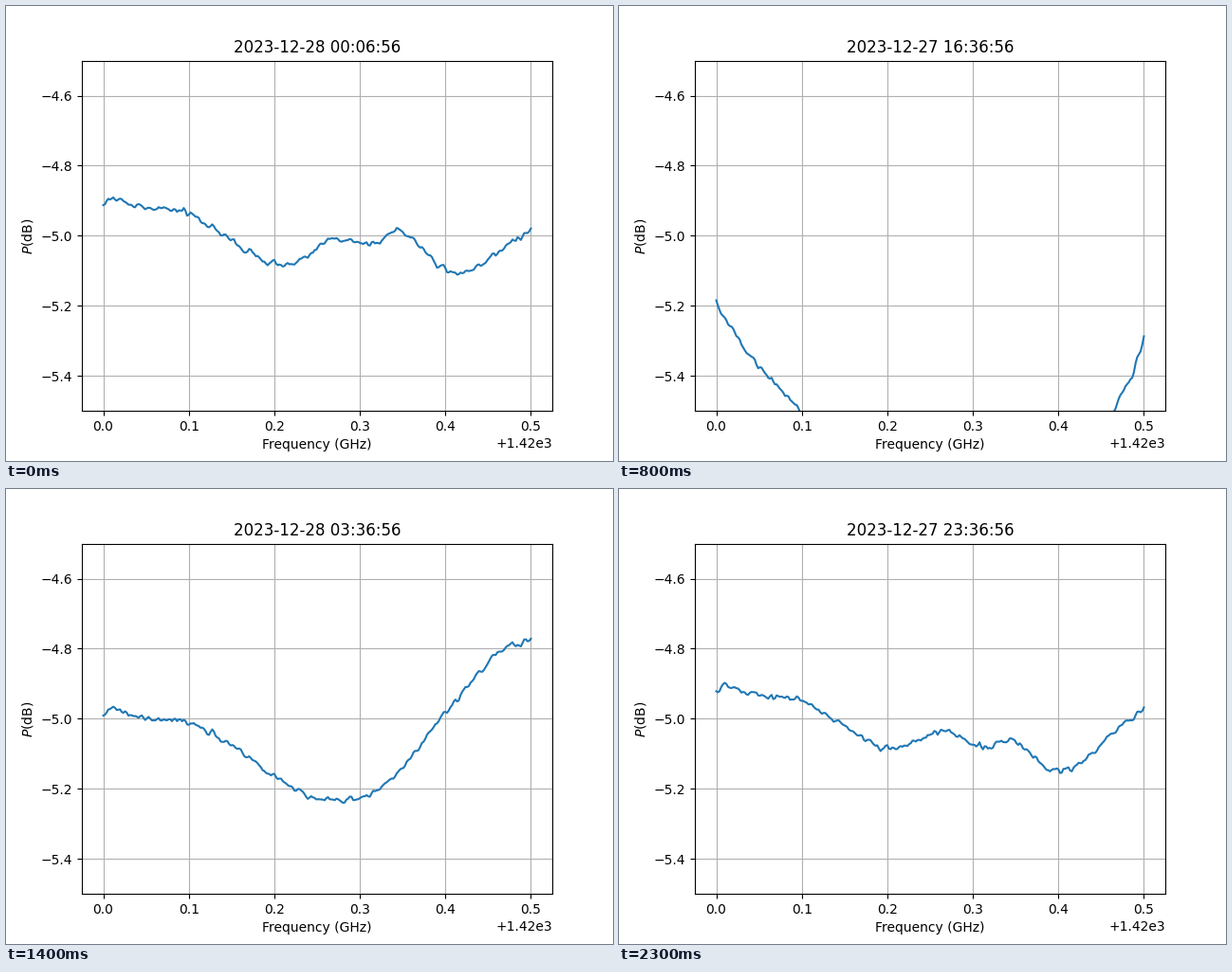
These frames come from a looping animation (640 px wide and 480 px high, 2400 ms). A matplotlib script:

```python
import numpy as np
import matplotlib.pyplot as plt
from matplotlib.animation import FuncAnimation

# Half-hour steps counted from 17:06:56 on the first day, shown out of order
ORDER = [14, 14, 5, 19, 8, 11, 16, 2, -1, 6, 17, 10,
         3, 20, 21, 7, 12, 1, 18, 9, 0, 15, 4, 13]
DUSK, DARK, DAWN = 8, 13, 21

x = np.linspace(0, .5, 256)


def ripple(seed):
    noise = np.random.default_rng(seed).normal(size=x.size + 2)
    return np.convolve(noise, [.35, .8, .35], "valid")


def ease_through(points):
    """Smooth curve that levels out at each turning point."""
    px, py = np.array(points).T
    i = np.clip(np.searchsorted(px, x, "right") - 1, 0, len(px) - 2)
    f = (x - px[i]) / (px[i + 1] - px[i])
    return py[i] + (py[i + 1] - py[i]) * f * f * (3 - 2 * f)


def evening(step):
    """Deep bowl, falling off from both band edges."""
    u = step / DUSK
    left = -191 - 57 * u - 2030 * x ** .8
    right = -285 + 32 * u - 3000 * (.5 - x) ** .8
    return np.maximum(left, right)


def night(step):
    """Turning points that drift to higher frequency until dawn."""
    u = (step - DARK) / (DAWN - DARK)
    head = 75 + 130 * u - 195 * u**2
    return ease_through([
        (0, head),
        (.006, head + 18),
        (.075, head - 12),
        (.21 + .06 * u**1.5, -84 - 147 * u**5),                 # valley
        (.265 + .02 * u**.5, -32 + 240 * u - 440 * u**2),       # bump
        (.315 - .025 * u**2, -80 + 545 * u - 693 * u**2),       # dip
        (.34 + .16 * u**2.6, -58 + 330 * (1 - np.exp(-2 * u))), # peak
        (.395 + .12 * u + .08 * u**4, -150 + 350 * u),          # notch
        (.53 + .13 * u**4, 60 - 200 * u + 490 * u**2),
    ])


def spectrum(step):
    # Levels in mdB relative to -5 dB
    if step <= DUSK:
        level = evening(step)
    elif step >= DARK:
        level = night(step)
    else:
        w = (step - DUSK) / (DARK - DUSK)
        level = (1 - w) * evening(DUSK) + w * night(DARK)
    return -5 + (level + 4.5 * ripple(7) + 3 * ripple(100 + step)) / 1000


def stamp(step):
    day, half = divmod(34 + step, 48)
    return f"2023-12-{27 + day} {half // 2:02d}:{6 + 30 * (half % 2):02d}:56"


fig, ax = plt.subplots(figsize=(6.4, 4.8), dpi=100)
line, = ax.plot(1420 + x, spectrum(ORDER[0]))
title = ax.set_title(stamp(ORDER[0]))
ax.set_xlim(1419.975, 1420.525)
ax.set_ylim(-5.5, -4.5)
ax.set_xlabel("Frequency (GHz)")
ax.set_ylabel("$P$(dB)")
ax.grid(True)


def update(i):
    step = ORDER[i]
    line.set_ydata(spectrum(step))
    title.set_text(stamp(step))
    return line, title


anim = FuncAnimation(fig, update, frames=len(ORDER), interval=100, repeat=True)
plt.show()
```
